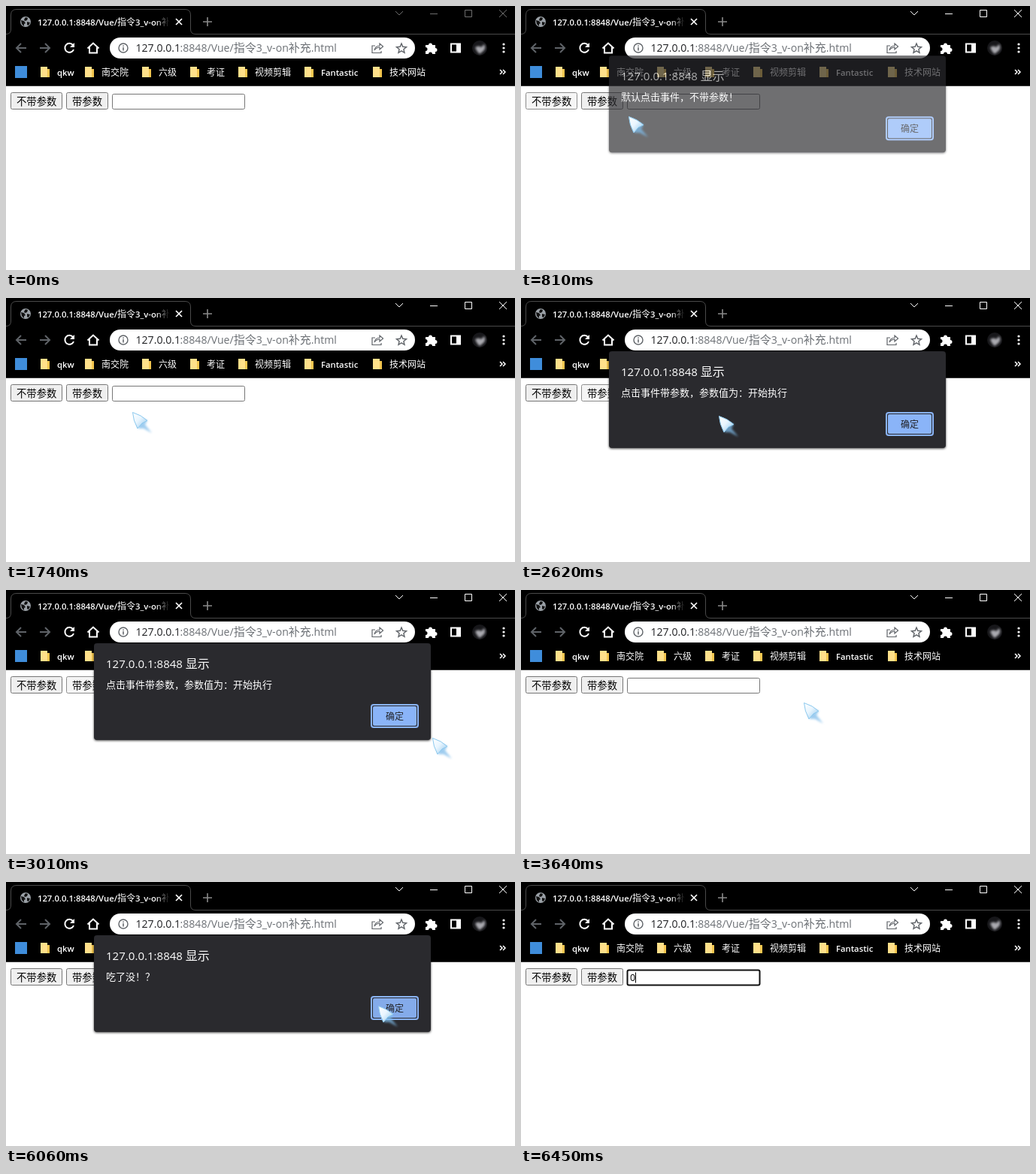
Recreate the animation shown at these times as an HTML page. Size 677x352 px, loop 6710 ms.

```html
<!DOCTYPE html>
<html lang="zh-CN">
<head>
<meta charset="utf-8">
<title>v-on</title>
<style>
html, body { margin: 0; height: 100%; overflow: hidden; background: #fff; }
svg { display: block; width: 100vw; height: 100vh; }
text { font-family: "Open Sans", "Noto Sans CJK SC", "Noto Sans CJK", sans-serif; white-space: pre; }
.line { fill: none; stroke: #fff; stroke-width: 2; }
.grey { stroke: #5f6368; }
.bar text { font-size: 12px; fill: #fff; font-weight: 500; }
.bar tspan { font-weight: 600; }
.page text { font-size: 13.33px; }
.button { fill: #efefef; stroke: #767676; }
.button.hover { fill: #e5e5e5; stroke: #4f4f4f; }
.button.active { fill: #f5f5f5; stroke: #8d8d8d; }
</style>
</head>
<body>
<svg viewBox="0 0 677 352">
  <defs>
    <linearGradient id="fade"><stop stop-opacity="0"/><stop offset="1"/></linearGradient>
    <linearGradient id="ice" x2="1" y2="1">
      <stop stop-color="#fff"/><stop offset=".45" stop-color="#e8f5fe"/><stop offset="1" stop-color="#8cc4ec"/>
    </linearGradient>
    <filter id="soft" x="-50%" y="-50%" width="200%" height="200%"><feGaussianBlur stdDeviation="1.5"/></filter>
    <filter id="shadow"><feDropShadow dx="0" dy="1" stdDeviation="1.7" flood-opacity=".7"/></filter>
  </defs>

  <rect width="677" height="352" fill="#fff"/>
  <rect width="677" height="107" fill="#000"/>
  <path d="M0 106.5H677" stroke="#3c3c3c"/>

  <!-- tab strip -->
  <path d="M0 37.5Q6.5 37.5 6.5 31V12Q6.5 4.5 14 4.5H238Q245.5 4.5 245.5 12V31Q245.5 37.5 252 37.5H677" fill="none" stroke="#4a4a4a"/>
  <circle cx="26" cy="21" r="7" fill="#9aa0a6"/>
  <path d="M20 19l4 1 2 3-2 1v3l-3-3zM26 15l3 1-1 3-3 1-1-2zM28 21l4 1-2 4-2-1z" fill="#111"/>
  <g class="bar"><text x="42" y="25.5">127.0.0.1:8848/Vue/指令3_v-on补充</text></g>
  <rect x="198" y="8" width="20" height="25" fill="url(#fade)"/>
  <rect x="217" y="8" width="27" height="25"/>
  <path d="M226 17l8 8m0-8l-8 8" class="line" style="stroke-width:1.7"/>
  <path d="M262 21h12m-6-6v12" class="line" style="stroke:#8a8a8a;stroke-width:1.6"/>
  <path id="controls" d="M518 7l5 5 5-5M564 10.5h10M610.5 5.5h9v9h-9zM656 5l10 10m0-10l-10 10" fill="none"/>

  <!-- toolbar -->
  <path d="M27 56H14m6-6l-6 6 6 6M45 56h13m-6-6l6 6-6 6" class="line grey"/>
  <path d="M89 52a6 6 0 1 0 1 6" class="line"/>
  <path d="M91 49v6h-6z" fill="#fff"/>
  <path d="M108.5 56.5L116 49.5l7.5 7M111 55v7.5h10V55" class="line"/>
  <rect x="138" y="42" width="406" height="28" rx="14" fill="#fff"/>
  <circle cx="156" cy="56" r="6" class="line grey" style="stroke-width:1.4"/>
  <path d="M156 55v4.5m0-7v1.5" class="line grey" style="stroke-width:1.5"/>
  <text x="172.5" y="61" font-size="15" fill="#202124">127.0.0.1</text>
  <text x="231.5" y="61" font-size="15" fill="#6c7075">:8848/Vue/指令3_v-on补充.html</text>
  <path d="M491 53h-4v9.5h12V60M490 59q1-6 7-6v-3l4.5 4-4.5 4v-3q-4 0-7 4" class="line grey" style="stroke-width:1.2"/>
  <path d="M526 50l1.8 4.3 4.7.4-3.6 3 1.1 4.6-4-2.5-4 2.5 1.1-4.6-3.6-3 4.7-.4z" class="line grey" style="stroke-width:1.4"/>
  <path d="M558 52h4a2.5 2.5 0 1 1 5 0h4v4a2.5 2.5 0 1 1 0 5v3h-4a2.5 2.5 0 0 0-5 0h-4v-4a2.5 2.5 0 0 0 0-5z" fill="#fff"/>
  <path d="M592 50.5h12v11h-12z" class="line"/>
  <rect x="599" y="50" width="5" height="12" fill="#fff"/>
  <circle cx="630" cy="56" r="10" fill="#17171a"/>
  <path d="M624 55q5-3 8 0l4-4q3 5-1 9l-5 4q-4-3-6-9" fill="#aaaab0" filter="url(#soft)"/>
  <g fill="#fff"><circle cx="662" cy="51" r="1.6"/><circle cx="662" cy="56" r="1.6"/><circle cx="662" cy="61" r="1.6"/></g>

  <!-- bookmarks -->
  <g class="bar" id="bookmarks">
    <rect x="12" y="80" width="16" height="16" fill="#3f8ddb"/>
    <path d="M657 85l3 3-3 3m4-6l3 3-3 3" class="line" style="stroke-width:1.5"/>
  </g>

  <g class="page">
    <rect id="plain" x="6.5" y="115.5" width="68" height="22" rx="2" class="button"/>
    <text x="14" y="132">不带参数</text>
    <rect id="withArg" x="80.5" y="115.5" width="55" height="22" rx="2" class="button"/>
    <text x="88" y="132">带参数</text>
    <rect id="field" x="141.5" y="117.5" width="176" height="20" rx="2" fill="#fff"/>
    <text id="typed" x="145" y="132">0</text>
    <path id="caret" d="M.5 120.5v14" stroke="#000"/>
  </g>

  <g id="dialog">
    <rect x="117" y="71" width="448" height="129" rx="4" fill="#292a2d" filter="url(#shadow)"/>
    <text x="133" y="104" font-size="16" font-weight="500" fill="#fff">127.0.0.1:8848 显示</text>
    <text id="message" x="133" y="131" font-size="13" font-weight="500" fill="#fff"></text>
    <rect x="486" y="153" width="62" height="30" rx="3" fill="none" stroke="#8ab4f8" stroke-width="2"/>
    <rect id="ok" x="488" y="155" width="58" height="26" rx="2"/>
    <text x="517" y="173" font-size="12" fill="#202124" text-anchor="middle">确定</text>
  </g>

  <g id="cursor">
    <g id="arrow">
      <path d="M4 6L20 11 17 17 26 28 15 22 8 22Z" fill="#7fbcea" opacity=".75" filter="url(#soft)"/>
      <path d="M.5.5Q12 4 20 11.5L13 15 7 22Q1 11 .5.5Z" fill="url(#ice)" stroke="#8ac8ee" stroke-linejoin="round"/>
    </g>
    <g id="beam" fill="none">
      <path d="M-4-10Q0-10 0-7V7Q0 10-4 10M4-10Q0-10 0-7M0 7Q0 10 4 10" stroke="#b5dcf5" stroke-width="4"/>
      <path d="M-4-10Q0-10 0-7V7Q0 10-4 10M4-10Q0-10 0-7M0 7Q0 10 4 10" stroke="#3c8cc6" stroke-width="2"/>
    </g>
  </g>
</svg>
<script>
const $ = id => document.getElementById(id);
const LOOP = 6710, STEP = 67.1, FADE = 200;
const clamp = v => Math.max(0, Math.min(1, v));

// Latin letters run wider in this face than the CJK ones need
const shrinkLatin = s => s.replace(/[\x20-\x7e]+/g, run => `<tspan font-size=".94em">${run}</tspan>`);

const bookmarks = [[46, 'qkw'], [105, '南交院'], [181, '六级'], [245, '考证'], [309, '视频剪辑'], [397, 'Fantastic'], [488, '技术网站']];
$('bookmarks').insertAdjacentHTML('beforeend', bookmarks.map(([x, name]) =>
  `<path d="M${x} 81h9v3h3v11h-12z" fill="#ffe08a"/><path d="M${x + 9} 84h3v11h-3z" fill="#f3c64f"/>
   <text x="${x + 22}" y="93">${name}</text>`).join(''));
document.querySelectorAll('text').forEach(el => el.innerHTML = shrinkLatin(el.textContent));

const dialogs = [
  { open: 740, close: 1480, text: '默认点击事件，不带参数！' },
  { open: 2420, close: 3370, text: '点击事件带参数，参数值为：开始执行' },
  { open: 5380, close: 6130, text: '吃了没！？' }
];

// time, x, y of the pointer tip
const path = [
  [70, 184, 213], [190, 184, 213], [390, 63, 146], [520, 63, 146], [600, 48, 128], [740, 48, 128],
  [900, 250, 168], [1065, 421, 184], [1110, 421, 184], [1400, 512, 168], [1500, 512, 168],
  [1735, 168, 152], [1775, 168, 152], [2000, 115, 132], [2200, 115, 132], [2280, 103, 124], [2420, 103, 124],
  [2700, 320, 168], [2995, 567, 197], [3040, 567, 197], [3100, 549, 188], [3290, 512, 168], [3400, 512, 168],
  [3780, 291, 139], [4090, 200, 129], [5400, 200, 129], [5620, 330, 199], [5970, 495, 165], [6150, 495, 165],
  [6370, 495, 278], [LOOP, 495, 278]
];

function pointerAt(t) {
  const i = path.findIndex(p => p[0] > t);
  if (i < 1) return path[0].slice(1);
  const [t0, x0, y0] = path[i - 1], [t1, x1, y1] = path[i];
  const k = (t - t0) / (t1 - t0);
  return [x0 + (x1 - x0) * k, y0 + (y1 - y0) * k].map(Math.round);
}

const show = (id, on) => $(id).setAttribute('visibility', on ? 'inherit' : 'hidden');

function drawDialog(t, sampled) {
  const d = dialogs.find(d => t >= d.open && t < d.close + FADE);
  show('dialog', d);
  if (!d) return;
  const opened = clamp((sampled - d.open + 60) / FADE);
  const closed = t < d.close ? 0 : clamp((sampled - d.close + 60) / FADE);
  const alpha = opened * (1 - closed);
  $('message').textContent = d.text;
  $('dialog').setAttribute('opacity', alpha);
  $('dialog').setAttribute('transform', `translate(0 ${-15 * (1 - alpha)})`);
}

function drawButton(id, x, y, left, right, pressed) {
  const over = x >= left && x < right && y >= 115 && y < 138;
  $(id).setAttribute('class', 'button' + (pressed ? ' active' : over ? ' hover' : ''));
}

function draw(t) {
  const sampled = Math.floor((t + 20) / STEP) * STEP + 10;
  const [x, y] = pointerAt(sampled);
  const modal = dialogs.findIndex(d => t >= d.open && t < d.close);
  drawDialog(t, sampled);

  drawButton('plain', x, y, 6, 75, modal === 0);
  drawButton('withArg', x, y, 80, 136, modal === 1);
  $('controls').setAttribute('stroke', t < 740 ? '#6e6e6e' : '#fff');

  const focused = t >= 4100, typed = t >= 4900;
  $('field').setAttribute('stroke', focused ? '#101010' : '#767676');
  $('field').setAttribute('stroke-width', focused ? 2 : 1);
  show('typed', typed);
  show('caret', focused && modal < 0 && (typed || t < 4570));
  $('caret').setAttribute('transform', `translate(${typed ? 152 : 145})`);

  const overOk = x >= 486 && x < 549 && y >= 153 && y < 184;
  $('ok').setAttribute('fill', overOk ? '#84abea' : '#8ab4f8');

  const overField = modal < 0 && x > 141 && x < 318 && y > 116 && y < 138;
  show('cursor', t >= 70 && t < 6450);
  show('arrow', !overField);
  show('beam', overField);
  $('cursor').setAttribute('transform', `translate(${x} ${y})`);
}

const start = performance.now();
function tick() {
  draw((performance.now() - start) % LOOP);
  requestAnimationFrame(tick);
}
tick();
</script>
</body>
</html>
```
